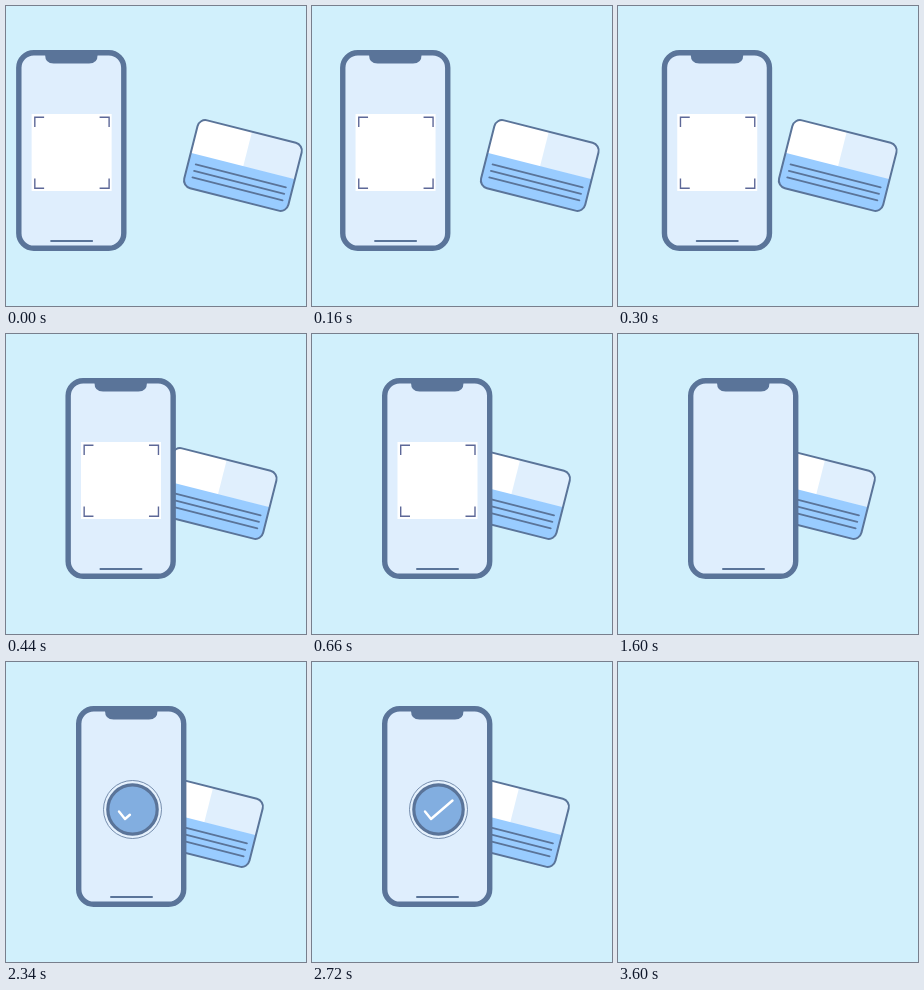
Write an HTML page that moves like this. It is 300x300 px and loops after 3620 ms.

```html
<!DOCTYPE html>
<html lang="en">
<head>
<meta charset="utf-8">
<title>Phone scanning a card</title>
<style>
  html, body { margin: 0; width: 100%; height: 100%; overflow: hidden; background: #d1f0fc; }
  svg { display: block; width: 100%; height: 100%; }
  .line { fill: none; stroke: #5a7499; stroke-linecap: round; stroke-linejoin: round; }
</style>
</head>
<body>
<svg viewBox="0 0 300 300">
  <defs>
    <clipPath id="cardShape"><rect x="-53.7" y="-35" width="107.4" height="70" rx="8"/></clipPath>
  </defs>
  <rect width="300" height="300" fill="#d1f0fc"/>
  <g id="scene">
    <g id="card">
      <g clip-path="url(#cardShape)">
        <rect x="-54" y="-36" width="108" height="72" fill="#fff"/>
        <rect x="0.5" y="-36" width="54" height="37" fill="#e0effd"/>
        <rect x="-54" y="0.6" width="108" height="36" fill="#99ccff"/>
      </g>
      <path class="line" stroke-width="1.8" d="M-46 10.6H47M-46 17.3H47M-46 24H47"/>
      <rect class="line" stroke-width="2" x="-53.7" y="-35" width="107.4" height="70" rx="8"/>
    </g>
    <g id="phone">
      <rect x="12.7" y="46.7" width="105" height="195.6" rx="15" fill="#dfeefd" stroke="#5a7499" stroke-width="5.4"/>
      <path fill="#5a7499" d="M39 46H91.500V49Q91.500 57.500 83 57.500H47.500Q39 57.500 39 49Z"/>
      <path class="line" stroke-width="2" d="M45 235H86"/>
      <g id="scanner">
        <rect x="25.500" y="108" width="80" height="77" fill="#fff"/>
        <path fill="none" stroke="#5d6898" stroke-width="1.4"
          d="M28.700 121V111.300H38M93.500 111.300H103V121M103 172.500V182.300H93.500M38 182.300H28.700V172.500"/>
      </g>
    </g>
    <g id="badge">
      <circle cx="126.500" cy="147.500" r="29" fill="#e6f2fe" stroke="#5a7499" stroke-width=".8"/>
      <circle cx="126.500" cy="147.500" r="24.700" fill="#82aee0" stroke="#5a7499" stroke-width="3.200"/>
      <path id="check" fill="none" stroke="#fff" stroke-width="2.400" stroke-linecap="round" stroke-linejoin="round"
        pathLength="100" stroke-dasharray="100 200" d="M113 149.500L119 157L140.500 138.500"/>
    </g>
  </g>
</svg>
<script>
  const LOOP = 3620, BLANK = 3600;
  const [scene, card, phone, scanner, badge, check] =
    ['scene', 'card', 'phone', 'scanner', 'badge', 'check'].map(id => document.getElementById(id));

  const progress = (t, from, to) => Math.min(1, Math.max(0, (t - from) / (to - from)));
  const show = (el, on) => el.setAttribute('visibility', on ? 'visible' : 'hidden');

  function render(t) {
    show(scene, t < BLANK);
    phone.setAttribute('transform', `translate(${60 * progress(t, 0, 535)} 0)`);
    card.setAttribute('transform', `translate(${237 - 39 * progress(t, 0, 680)} 159.5) rotate(14.2)`);
    scanner.setAttribute('opacity', 1 - progress(t, 1390, 1600));
    badge.setAttribute('opacity', progress(t, 2070, 2280));

    const drawn = progress(t, 2180, 2560);
    check.setAttribute('stroke-dashoffset', 100 * (1 - drawn));
    check.setAttribute('opacity', drawn > 0 ? 1 : 0);
  }

  const start = performance.now();
  function tick() {
    render((performance.now() - start) % LOOP);
    requestAnimationFrame(tick);
  }
  render(0);
  requestAnimationFrame(tick);
</script>
</body>
</html>
```
